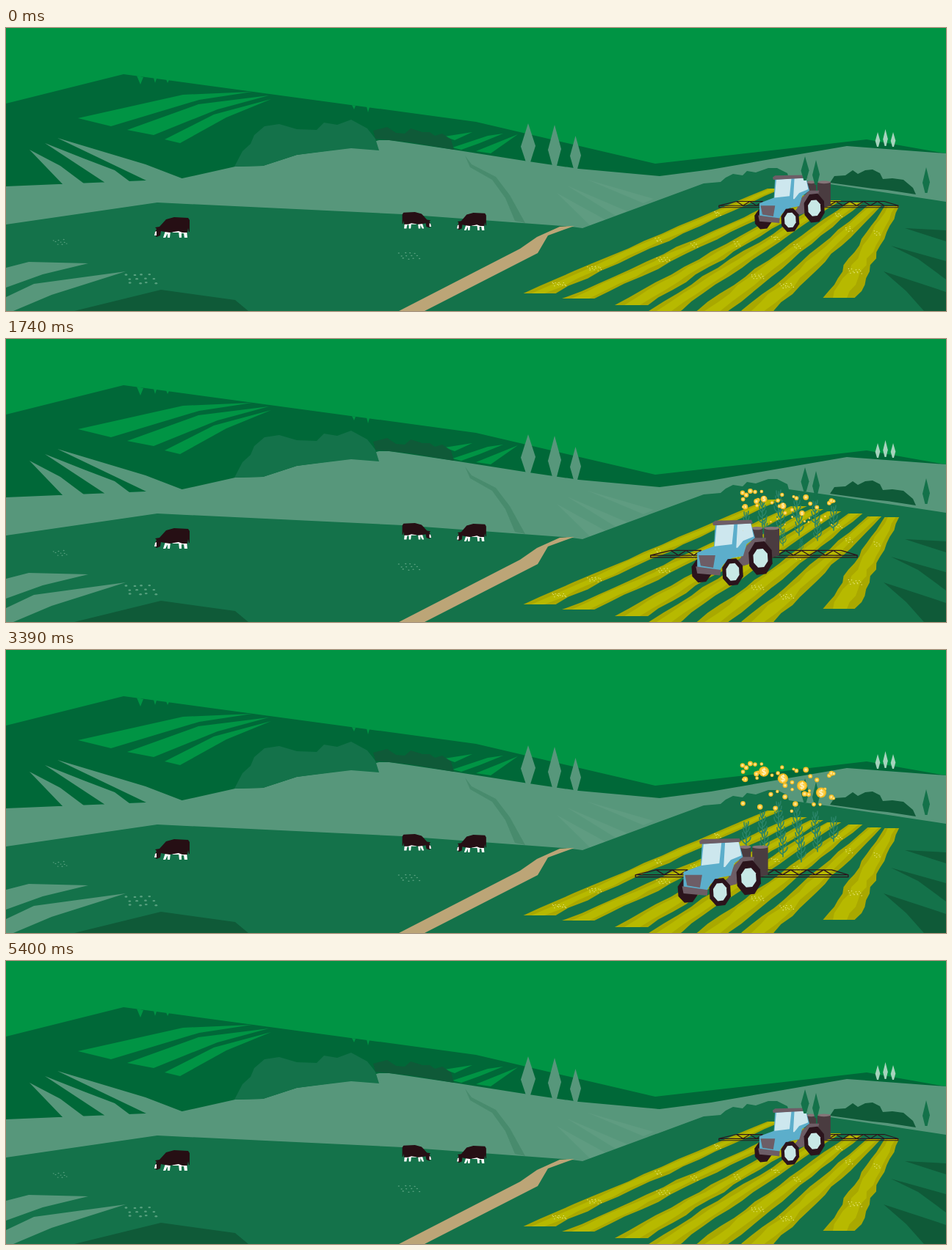
Animation, 1280 px wide and 386 px high, one loop 5430 ms. Source, as an HTML page:

```html
<!DOCTYPE html>
<html lang="en">
<head>
<meta charset="utf-8">
<title>Spraying the field</title>
<style>
html, body { margin: 0; height: 100%; overflow: hidden; background: #009444 }
svg { display: block; width: 100%; height: 100% }
.sky { fill: #009444 } .hill { fill: #006838 } .sage { fill: #57977b }
.field { fill: #14724a } .deep { fill: #0f5a38 } .pale { fill: #a6d3bd }
.blue { fill: #5caecb } .glass { fill: #cde7ee } .grey { fill: #6d5d66 }
.dark { fill: #2b141c } .hub { fill: #c8e8e6 } .tank { fill: #4a3c40 }
.lid { fill: #857478 } .white { fill: #fff }
.plant { fill: none; stroke: #2a8468; stroke-width: 1.5; stroke-linecap: round }
.boom { fill: none; stroke: #2b141c; stroke-width: 1.4 }
text { font: bold 11px Lato, sans-serif; fill: #fff6d0; text-anchor: middle }
</style>
</head>
<body>
<svg viewBox="0 0 1280 386" preserveAspectRatio="none">
<defs>
  <path id="tree" d="M0,0 1,.58 .3,1 -.3,1 -1,.6Z"/>
  <g id="cow">
    <path class="white" d="M15,19 22,19 21,28 18,28 18,22 15,28 12,28ZM23,18 34,18 33,21 25,21ZM33,19 44,18 45,28 41,28 40,22 37,22 37,28 34,28Z"/>
    <path fill="#260f14" d="M16,3 27,0 46,1 48,4 48,20 47,20 46,15 45,21 38,21 33,19 27,20 21,21 14,20 9,19 8,25 3,27 0,23 3,16 1,14 7,13Z"/>
    <path class="white" d="M1,20 3,19 3,25 0,25Z"/>
  </g>
</defs>
<path class="sky" d="M0,0H1280V386H0Z"/>
<path class="hill" d="M0,103 160,63 190,67 640,128 884,185 1172,152 1262,168 1280,171V260H0Z"/>
<path class="sky" d="M178,65 187,67 183,77ZM201,68 205,69 203,75ZM218,70 222,71 220,75ZM471,105 476,106 474,111ZM491,107 495,108 493,115Z
  M98,123 241,91 335,87 263,98 143,134ZM165,139 262,104 358,92 288,111 201,146ZM216,152 283,118 361,97 300,122 237,157Z
  M597,148 635,142 611,153ZM608,163 656,147 677,144 645,157 620,166ZM640,168 697,145 660,171Z"/>
<path class="sage" d="M32,166 74,188 106,212 78,214ZM53,157 106,178 148,194 168,209 135,211ZM70,150 190,186 242,206 191,208Z
  M0,216 190,208 240,205 312,189 350,188 396,173 470,163 508,153 522,153 610,166 705,181 780,192 890,202 960,193 1145,161 1280,171V300H0Z"/>
<path class="field" d="M311,189 322,168 333,158 338,146 352,134 372,131 396,138 423,139 433,129 451,132 470,125 492,137 503,151 508,167 470,164 396,173 350,188Z"/>
<path class="deep" d="M503,151 500,140 519,135 531,143 543,144 551,137 567,142 577,142 584,147 594,144 606,152 610,166 550,156 522,153Z"/>
<path fill="#488b6d" d="M625,174 634,186 667,203 686,228 707,266 693,263 680,232 662,207 632,190Z"/>
<path fill="#5f9c81" d="M750,225 817,262 797,271ZM764,215 846,250 830,256ZM792,207 882,233 868,239Z"/>
<g id="farTrees"></g>
<path class="field" d="M0,268 206,238 540,254 770,271 785,273 950,212 973,210 980,204 990,199 1003,201 1009,195 1021,197 1038,191 1050,191 1064,198 1066,205 1122,213 1280,237V386H0Z"/>
<path class="deep" d="M1122,211 1128,202 1143,201 1153,194 1160,199 1170,194 1180,193 1190,198 1194,206 1207,205 1222,207 1235,218 1239,227 1200,221 1180,219Z
  M93,386 211,357 312,371 330,386ZM1224,273 1280,276V291ZM1205,297 1280,318V343L1242,315ZM1195,332 1280,360V386H1250L1226,359Z"/>
<path class="sage" d="M0,327 31,319 112,321 50,336 0,354ZM0,367 38,349 163,332 62,364 10,386H0Z"/>
<path fill="#bca577" d="M535,386 700,301 723,285 754,271 774,270 738,283 724,307 570,386Z"/>
<use href="#cow" transform="translate(202 258)"/>
<use href="#cow" transform="translate(579 251) scale(-.82 .8)"/>
<use href="#cow" transform="translate(614 252) scale(.83 .86)"/>
<g id="crops"></g>
<g id="flecks"></g>
<g id="plants" class="plant"></g>
<g id="tractor"><g transform="translate(-956 -341)">
  <g id="boom" class="boom"></g>
  <path class="tank" d="M984,278H1000V318H984ZM1002,278H1024V317L1014,320 1002,318Z"/>
  <ellipse class="lid" cx="992" cy="278" rx="8" ry="2.3"/>
  <ellipse class="lid" cx="1013" cy="278" rx="11" ry="2.3"/>
  <g id="farWheel"></g>
  <path class="grey" d="M968,322 977,303 989,292 1005,292 1003,301 988,310 980,330 950,338Z"/>
  <path class="blue" d="M932,271 983,270 989,292 977,301 972,318 956,321 944,330 938,340 906,334 906,313 930,304Z"/>
  <path class="glass" d="M934,274 959,272 956,301 931,304ZM964,272 983,271 987,290 972,296 964,306 962,306Z"/>
  <path class="grey" d="M928,270 932,267 984,266 986,271 929,274ZM908,317 932,317 929,335 911,332ZM904,333 940,338 939,346 906,343Z"/>
  <g id="wheels"></g>
</g></g>
<g id="nearTrees"></g>
<g id="coins"></g>
</svg>
<script>
const LOOP = 5430;
const $ = id => document.getElementById(id);
const add = (id, markup) => $(id).insertAdjacentHTML('beforeend', markup);
const range = (n, f) => Array.from({ length: n }, (_, i) => f(i));
const clamp = v => Math.max(0, Math.min(1, v));
const ramp = (t, from, span) => clamp((t - from) / span);
const smooth = s => s * s * (3 - 2 * s);
const place = (node, x, y, s) =>
  node.setAttribute('transform', `translate(${x} ${y}) scale(${s})`);
let seed = 7;
const rand = () => (seed = seed * 16807 % 2147483647) / 2147483647;

function tree(id, cls, x, y, h, w) {
  add(id, `<use href="#tree" class="${cls}" transform="translate(${x} ${y}) scale(${w} ${h})"/>`);
}
tree('farTrees', 'sage', 711, 130, 53, 10);
tree('farTrees', 'sage', 747, 132, 57, 9);
tree('farTrees', 'sage', 775.5, 147, 46, 7.5);
range(3, i => tree('farTrees', 'pale', 1187 + 10.5 * i, i == 1 ? 138 : 142, i == 1 ? 23 : 20, 3.3));
tree('nearTrees', 'field', 1088, 175, 33, 5.5);
tree('nearTrees', 'field', 1103, 180, 34, 5);
tree('nearTrees', 'field', 1253, 190, 35, 5);

// Loose cluster of small dots in three staggered lines
function flecks(x, y, cols, gap, fill) {
  range(cols * 3, i => {
    const line = i % 3 - 1, col = Math.floor(i / 3) - (cols - 1) / 2;
    const px = x + (col + line % 2 * .35 + rand() * .4 - .2) * gap;
    const py = y + line * gap * .5 + (rand() - .5) * 2;
    add('flecks', `<ellipse cx="${px}" cy="${py}" rx="${gap * .17}" ry="${gap * .11}" fill="${fill}"/>`);
  });
}
flecks(74, 292, 3, 6, '#58a07f');
flecks(183, 342, 4, 11, '#58a07f');
flecks(549, 311, 4, 7, '#58a07f');

// Furrow from its near end to its far end, flecked at the given fractions
function furrow(x0, y0, x1, y1, ...spots) {
  const edge = side => range(15, i => {
    const s = i / 14;
    const x = x0 + (x1 - x0) * s + side * (22 - 12 * s) + (rand() - .5) * (7 - 4 * s);
    return [x, y0 + (y1 - y0) * s];
  });
  const band = (a, b, fill) =>
    add('crops', `<polygon fill="${fill}" points="${edge(a).concat(edge(b).reverse()).join(' ')}"/>`);
  band(-1, 1, '#a9a800');
  band(-.5, .5, '#b7b900');
  for (const s of spots)
    flecks(x0 + (x1 - x0) * s, y0 + (y1 - y0) * s, s < .4 ? 4 : 2, 4.8, '#ecec8c');
}
furrow(724, 362, 1046, 219, .09, .24, .51, .76);
furrow(782, 369, 1080, 228, .38, .52);
furrow(850, 378, 1104, 232, .57);
furrow(879, 396, 1127, 235, .68);
furrow(949, 396, 1156, 238, .36, .62, .89);
furrow(1014, 396, 1183, 242, .29, .79);
furrow(1136, 368, 1206, 243, .29, .71);

// Folding arms with their lattice
const arm = (x0, x1, tip) => {
  const n = Math.round(Math.abs(x1 - x0) / 12);
  const lattice = range(n + 1, i => [x0 + (x1 - x0) * i / n, i % 2 ? 317 : 310]).join(' ');
  add('boom', `<path d="M${x0},317H${tip}M${x0},320H${tip}V317L${x1},310H${x0}M${lattice}"/>`);
};
arm(912, 868, 839);
arm(1010, 1113, 1136);

const wheel = (id, cls, x, y, rx, ry) => add(id, `<polygon class="${cls}" points="${
  range(8, i => [x + rx * 1.06 * Math.cos((i + .4) * Math.PI / 4), y + ry * 1.06 * Math.sin((i + .4) * Math.PI / 4)]).join(' ')}"/>`);
wheel('farWheel', 'dark', 912, 339, 14, 17);
wheel('wheels', 'dark', 997, 321, 17, 24);
wheel('wheels', 'hub', 997, 321, 10.5, 13.5);
wheel('wheels', 'dark', 957, 341, 15, 19.5);
wheel('wheels', 'hub', 957, 341, 9.5, 12.5);

// Three ranks of four plants, the last rank nearest
const plants = range(12, i => {
  const rank = Math.floor(i / 4), k = i % 4;
  return { rank, x: 1052 + 25 * k - 22 * rank, y: 240 + 7 * k + 14 * rank };
});
const leaves = range(4, i => `M0,${-3 - 7 * i}q${i - 6},-3 ${i - 6},-9M0,${-5 - 7 * i}q${6 - i},-3 ${6 - i},-8`).join('');
plants.forEach(p => p.node = $('plants').appendChild(
  document.createElementNS('http://www.w3.org/2000/svg', 'path')));
plants.forEach(p => p.node.setAttribute('d', 'M0,0V-32' + leaves));

// Small coins scattered in a sloping cloud, then four large ones
const coins = range(42, i => {
  const x = 1002 + 133 * rand();
  return { x, y: 171 + (x - 1002) * .13 + 62 * rand() ** 1.6, r: 2 + 2 * rand() };
}).concat(range(4, i => ({ x: 1032 + 26 * i, y: 185 + 9.6 * i, r: 7 })));
coins.forEach(c => {
  const { r } = c;
  add('coins', `<g><circle r="${r}" fill="#f7b91c"/><circle r="${r * .75}" fill="#fdd04a"/>` +
    (r > 5 ? '<text y="4">$</text>' : `<circle r="${r * .4}" fill="#fee9a0"/>`) + '</g>');
  c.node = $('coins').lastChild;
});

function draw(now) {
  const t = now % LOOP;
  const far = 1 - smooth(t < 2740 ? ramp(t, 0, 2715) : 1 - ramp(t, 2770, LOOP - 2770));
  place($('tractor'), 956 + 111 * far, 341 - 79 * far, 1 - .1785 * far);

  for (const { node, rank, x, y } of plants) {
    const grown = smooth(ramp(t, 1150 + (y - 240) * 8, 400));
    const gone = smooth(ramp(t, 3980 - 200 * rank, 500));
    place(node, x, y, grown * (1 - gone));
  }

  const rise = .04 * Math.max(0, t - 2080);
  const fade = 1 - smooth(ramp(t, 3500, 250));
  for (const { node, x, y, r } of coins) {
    const pop = smooth(ramp(t, 1250 + (y - 165) * 7, 300));
    const swell = r > 5 ? .65 + .35 * smooth(ramp(t, 1740, 1100)) : 1;
    place(node, x, y + 33.2 - rise, pop * swell * fade);
  }
  requestAnimationFrame(draw);
}
draw(0);
</script>
</body>
</html>
```
